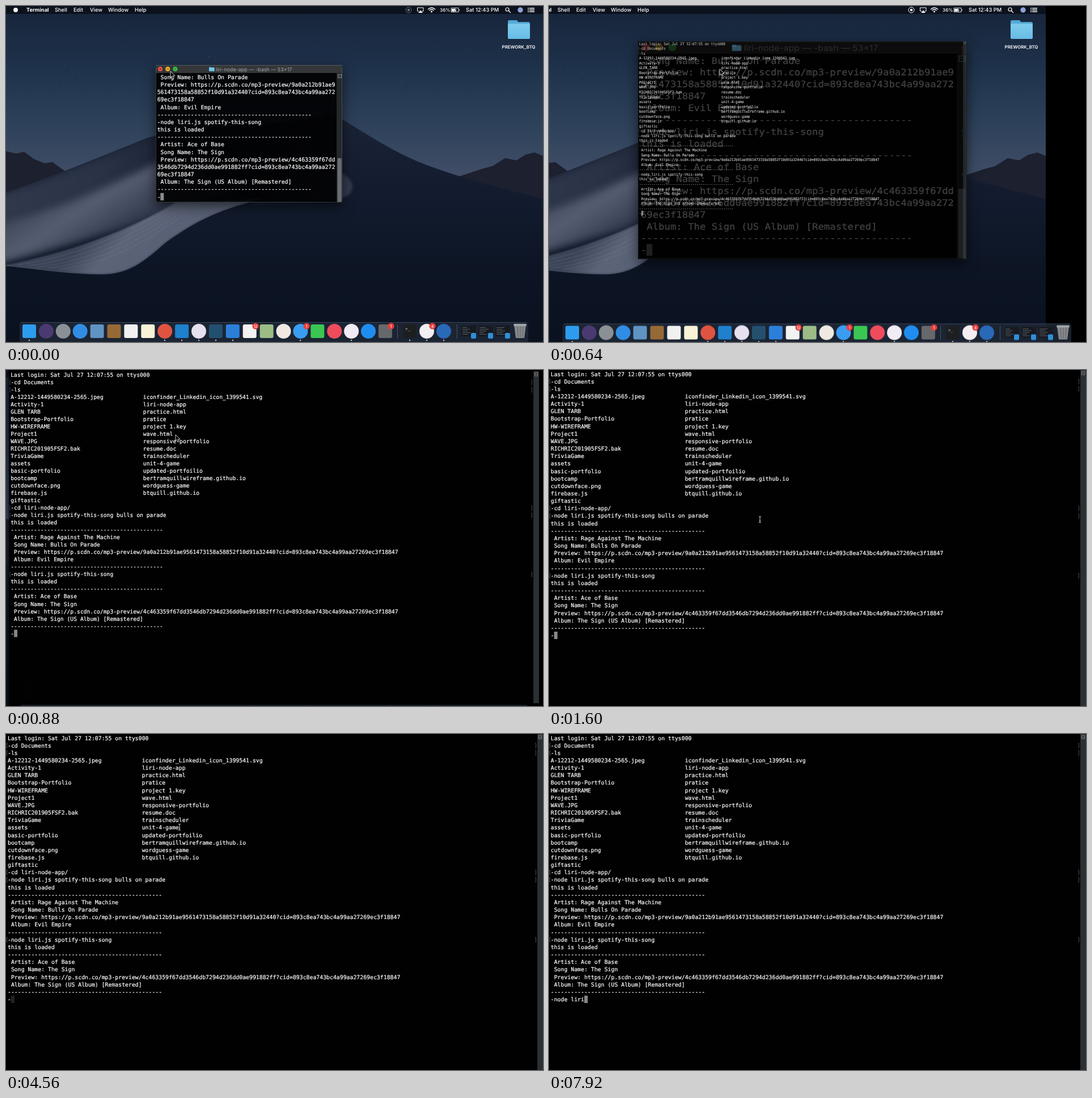
These frames come from a looping animation (947x592 px, 8 s). An HTML page with a canvas:

```html
<!DOCTYPE html>
<html lang="en">
<head>
<meta charset="utf-8">
<title>Terminal going full screen</title>
<style>
html, body { margin: 0; width: 100%; height: 100%; overflow: hidden; background: #000; }
canvas { display: block; }
</style>
</head>
<body>
<canvas id="stage" width="947" height="592"></canvas>
<script>
const W = 947, H = 592, LOOP = 8000, STEP = 80;
const CHAR = 5.923, ROW = 13.157;
const MONO = '9.837px "DejaVu Sans Mono", monospace';
const SANS = 'Inter, sans-serif';
const WIN = { x: 264, y: 104, w: 329, h: 242 };
let g = document.getElementById('stage').getContext('2d');

// Terminal contents
const CID = '?cid=893c8ea743bc4a99aa27269ec3f18847';
const URL_BASE = 'https://p.scdn.co/mp3-preview/';
const DASHES = '-'.repeat(46);
const song = (artist, name, hash, album) => [
  'this is loaded', DASHES, ' Artist: ' + artist, ' Song Name: ' + name,
  ' Preview: ' + URL_BASE + hash + CID, ' Album: ' + album, DASHES];
const LEFT = ['A-12212-1449580234-2565.jpeg', 'Activity-1', 'GLEN TARB', 'Bootstrap-Portfolio',
  'HW-WIREFRAME', 'Project1', 'WAVE.JPG', 'RICHRIC201905FSF2.bak', 'TriviaGame', 'assets',
  'basic-portfolio', 'bootcamp', 'cutdownface.png', 'firebase.js', 'giftastic'];
const RIGHT = ['iconfinder_Linkedin_icon_1399541.svg', 'liri-node-app', 'practice.html', 'pratice',
  'project 1.key', 'wave.html', 'responsive-portfolio', 'resume.doc', 'trainscheduler',
  'unit-4-game', 'updated-portfoilio', 'bertramquillwireframe.github.io', 'wordguess-game',
  'btquill.github.io'];
const LINES = [
  'Last login: Sat Jul 27 12:07:55 on ttys000', '-cd Documents', '-ls',
  ...LEFT.map((name, i) => name.padEnd(40) + (RIGHT[i] || '')),
  '-cd liri-node-app/', '-node liri.js spotify-this-song bulls on parade',
  ...song('Rage Against The Machine', 'Bulls On Parade',
    '9a0a212b91ae9561473158a58852f10d91a32440', 'Evil Empire'),
  '-node liri.js spotify-this-song',
  ...song('Ace of Base', 'The Sign',
    '4c463359f67dd3546db7294d236dd0ae991882ff', 'The Sign (US Album) [Remastered]')];
const WRAPPED = LINES.flatMap(s => s.match(/.{1,53}/g)).slice(-16);
const MARKED = [1, 2, 18, 19, 27];

// Motion: [time, value]
const ZOOM = [[400, 0], [480, .02], [560, .12], [640, .405], [720, .755], [800, .92], [880, .98], [960, 1]];
const SLIDE = [[480, 0], [560, 14], [640, 71], [720, 257], [800, 640], [880, 942], [960, 1010]];
const DOCK_DROP = [[480, 0], [560, .5], [640, 2.5], [720, 9], [800, 22], [880, 33], [960, 45]];
const MOUSE_X = [[0, 290], [320, 301], [720, 301], [880, 299], [1120, 300], [1680, 384], [1840, 384], [2080, 306]];
const MOUSE_Y = [[0, 115], [320, 111], [720, 111], [880, 114], [1120, 116], [1680, 288], [1840, 288], [2080, 164]];
const TYPED = 'node liri';
const KEYS = [5120, 6000, 6320, 6400, 6800, 7120, 7360, 7520, 7680];

function at(keys, t) {
  if (t <= keys[0][0]) return keys[0][1];
  for (let i = 1; i < keys.length; i++) {
    const [t0, a] = keys[i - 1], [t1, b] = keys[i];
    if (t <= t1) return a + (b - a) * (t - t0) / (t1 - t0);
  }
  return keys[keys.length - 1][1];
}

// Drawing helpers
function rect(x, y, w, h, color, r = 0) {
  g.fillStyle = color;
  g.beginPath();
  g.roundRect(x, y, w, h, r);
  g.fill();
}
function disc(x, y, r, color) {
  g.fillStyle = color;
  g.beginPath();
  g.arc(x, y, r, 0, 7);
  g.fill();
}
function text(s, x, y, font, color = '#fff', align = 'left') {
  g.font = font;
  g.textRendering = 'geometricPrecision';
  g.textAlign = align;
  g.fillStyle = color;
  g.fillText(s, x, y);
}
// Terminal type, slightly thickened
function mono(s, x, y) {
  text(s, x, y, MONO);
  g.strokeStyle = '#fff';
  g.lineWidth = .22;
  g.strokeText(s, x, y);
}
function shape(d, fill) {
  g.fillStyle = fill;
  g.fill(new Path2D(d));
}
function stroke(d, color, width = 1) {
  g.strokeStyle = color;
  g.lineWidth = width;
  g.stroke(new Path2D(d));
}
function blend(x0, y0, x1, y1, ...colors) {
  const grad = g.createLinearGradient(x0, y0, x1, y1);
  colors.forEach((c, i) => grad.addColorStop(i / (colors.length - 1), c));
  return grad;
}
function folder(x, y, w, h) {
  rect(x, y, w * .45, h * .4, '#4fa6d3', h * .08);
  rect(x, y + h * .1, w, h * .9, '#58add9', h * .08);
  rect(x, y + h * .2, w, h * .8, blend(0, y, 0, y + h, '#85d0f0', '#67bce5'), h * .08);
}

function wallpaper() {
  rect(0, 0, W, H, blend(0, 0, 0, 310, '#162439', '#1e314a', '#2d415a', '#434f68'));
  for (let i = 0; i < 40; i++) {
    const n = k => Math.abs(Math.sin(i * k) * 4375.3) % 1;
    rect(n(12.9) * W, 16 + n(78.2) * 150, 1, 1, `rgba(190,210,235,${.1 + n(3.7) * .25})`);
  }
  shape('M0 256L18 260L32 257L50 270L68 277L82 275L104 291L130 303V340H0Z', '#1d202e');
  shape('M800 300L836 288L858 282L880 268L900 272L916 262L932 258L947 264V360H800Z', '#1c202f');
  const dune = 'M0 328C80 302 160 268 250 232C380 200 490 218 567 187C600 200 640 232 700 262C760 292 850 315 947 340V592H0Z';
  shape(dune, blend(0, 190, 0, 592, '#1b2437', '#131c2f', '#0d1525', '#0a111f'));
  // Soft light on the sand, kept inside the dune
  g.save();
  g.clip(new Path2D(dune));
  g.filter = 'blur(7px)';
  shape('M-20 334C80 302 160 268 250 232L430 218L400 340L-20 455Z', blend(0, 330, 330, 250, '#30384b', '#2a3245', '#182033'));
  shape('M-20 385C90 362 180 318 280 270L420 270L430 325C280 350 130 420 -20 452Z',
    blend(60, 330, 130, 440, '#3b4356', '#565d71', '#343c50'));
  g.filter = 'blur(2px)';
  shape('M567 187C540 220 520 250 590 293C612 305 616 320 605 332C590 346 520 344 440 350L350 300L430 218Z',
    blend(400, 200, 610, 330, '#151d2f', '#1d2639', '#353d50'));
  g.filter = 'blur(1px)';
  shape('M-4 457C110 435 220 395 300 345L450 340C365 360 325 385 280 417C243 450 215 473 165 472C100 471 50 462 -4 457Z',
    blend(150, 405, 215, 470, '#3c4458', '#5c6478', '#596176'));
  g.restore();
  for (let i = 0; i < 5; i++)
    stroke(`M${20 + i * 18} ${456 + i * 2}C${130 + i * 12} ${442 + i * 3} ${210 + i * 7} ${400 + i * 6} ${310 + i * 8} 347`,
      'rgba(150,160,182,.1)', 2);
  stroke('M0 457C50 462 100 471 165 472C215 473 243 450 280 417C325 385 365 360 450 340', 'rgba(165,173,192,.35)');
}

function menuBar(active) {
  rect(0, 0, W, 14, '#0c121d');
  const font = '500 9.3px ' + SANS;
  disc(17, 7, 4, '#f2f2f2');
  text('Terminal', 36, 10.4, '700 9.3px ' + SANS);
  [['Shell', 86], ['Edit', 119], ['View', 148], ['Window', 180], ['Help', 227]]
    .forEach(([s, x]) => text(s, x, 10.4, font));
  const tone = active ? '#fff' : '#68707c';
  stroke('M715 7A5 5 0 1 1 705 7A5 5 0 1 1 715 7', tone);
  rect(708, 5, 4, 4, tone);
  stroke('M728 9H725.5V3H736V9H733.5', '#fff');
  shape('M727 12L731 7.5L735 12Z', '#fff');
  stroke('M744 6Q750.5 0 757 6M746.5 8Q750.5 4 754.5 8', '#fff', 1.3);
  disc(750.5, 10, 1.4, '#fff');
  text('36%', 765, 10.2, '500 8.2px ' + SANS);
  stroke('M785 3.5H798V10.5H785ZM799.5 6V8.5', '#ddd');
  rect(786, 5, 5, 4.5, '#fff');
  shape('M793 3L789 7.8H792L791 11.5L795 6.5H792Z', '#fff');
  text('Sat 12:43 PM', 811, 10.4, font);
  stroke('M887 6A3 3 0 1 1 881 6A3 3 0 1 1 887 6M886.5 8.5L890 12', '#fff', 1.2);
  disc(907, 7, 4.7, '#8f9fd8');
  stroke('M920 4H922M923 4H932M920 7H922M923 7H932M920 10H922M923 10H932', '#fff', 1.4);
}

function desktop(active) {
  wallpaper();
  menuBar(active);
  folder(885, 25, 39, 33);
  text('PREWORK_BTQ', 904, 75, '600 7.8px ' + SANS, '#fff', 'center');
}

// Dock icons as plain circles (c) and squares (s)
const ICONS = ('s2e9cee c4b3a72 c8a9096 c318de4 s5f93c2 s966a36 sf1f1f1 sf8f2d6 cdf5440 s1f80cd ce6e1ef s23506e ' +
  's2c7fd8 sf2f2f2 s9cbc86 cefe9e2 c3b9df2 s3bc654 cee4c5c cf1ebf5 c1f8def s66686c').split(' ');
const APPS = 's1d1e20 cf2eef2 c2a68b8'.split(' ');
function icon(code, x) {
  const color = '#' + code.slice(1);
  code[0] === 'c' ? disc(x, 573, 13, color) : rect(x - 12, 561, 24, 24, color, 3);
}
function dock() {
  rect(24, 557, 897, 40, 'rgba(32,41,57,.82)', 4);
  stroke('M27 557.5H918', 'rgba(130,145,170,.3)');
  ICONS.forEach((c, i) => icon(c, 41 + i * 29.9));
  APPS.forEach((c, i) => icon(c, 712 + i * 30));
  text('>_', 704, 571, '7px "DejaVu Sans Mono", monospace', '#ddd');
  stroke('M690.5 561V586M795.5 561V586', 'rgba(160,170,190,.35)');
  [816, 846, 876].forEach((x, i) => {
    rect(x - 13, 563, 26, 19, '#171a20', 1);
    for (let k = 0; k < 5; k++) rect(x - 11, 566 + k * 3, 8 + (k * 5 + i * 3) % 9, 1, '#59616b');
    rect(x + 4, 576, 9, 10, '#2f8ed8', 2);
  });
  shape('M896 562H917L914 585H899Z', '#85888b');
  stroke('M902 564L903 583M907 564V583M912 564L911 583', '#5e6265');
  rect(895, 560, 23, 4, '#a4a7a9', 2);
  [[440, '12'], [530, '1'], [679, '1'], [752, '4']].forEach(([x, n]) => {
    disc(x, 564, 5.6, '#ec3d3a');
    text(n, x, 566.5, '500 7px ' + SANS, '#fff', 'center');
  });
  [41, 280, 310, 340, 370, 400, 519, 609, 712, 742, 772].forEach(x => disc(x, 589, 1.2, '#c8ced8'));
}

function smallWindow() {
  rect(0, 0, WIN.w, WIN.h, 'rgba(0,0,0,.91)', 4);
  rect(0, 0, WIN.w, 14, '#343638', [4, 4, 0, 0]);
  rect(0, 0, WIN.w, 1, '#55585a', 1);
  [['#f2504a', 'M6.5 5.5L9.5 8.5M9.5 5.5L6.5 8.5'], ['#f0b429', 'M19 7H23.5'], ['#35c048', 'M33 8.5L36 5.5']]
    .forEach(([c, mark], i) => {
      disc(8 + i * 13.2, 7, 4, c);
      stroke(mark, 'rgba(60,20,0,.7)');
    });
  folder(94, 3.5, 9.5, 7.5);
  text('liri-node-app — -bash — 53×17', 106, 10.5, '400 9px ' + SANS, '#a6a8aa');
  WRAPPED.forEach((s, i) => mono(s, 2.7, 25 + i * ROW));
  mono('-', 2.7, 25 + 16 * ROW);
  rect(8.3, 225.5, 6, 13, '#8d8d8d');
  rect(319, 14, 10, 228, '#25282a');
  rect(320.5, 164, 7, 77, '#6b6e70', 2);
  stroke('M321.5 16.5H327.5V22.5H321.5ZM323 19.5H326', '#8a8d8f');
  stroke('M.5 5V238Q.5 241.5 4 241.5H325Q328.5 241.5 328.5 238V5', 'rgba(140,145,150,.35)');
}

function fullWindow(typed, caret) {
  rect(0, 0, W, H, '#010101');
  rect(937, 0, 10, H, '#2c3033');
  stroke('M939.5 2.5H944.5V8.5H939.5ZM940.5 5.5H943.5', '#7c8082');
  MARKED.forEach(i => {
    const y = 7 + i * ROW;
    stroke(`M3 ${y - 4}H1.5V${y + 4}H3M933 ${y - 4}H934.5V${y + 4}H933`, '#4a4a4a');
  });
  LINES.forEach((s, i) => mono(s, 3, 10.5 + i * ROW));
  const prompt = '-' + typed;
  mono(prompt, 3, 10.5 + 35 * ROW);
  rect(3 + prompt.length * CHAR, 461, 6, 13, `rgba(136,136,136,${caret})`);
}

function pointer(t) {
  g.save();
  g.translate(at(MOUSE_X, t), at(MOUSE_Y, t));
  if (t < 960) {
    const arrow = 'M0 0V11L2.7 8.6L4.5 12.6L6.3 11.8L4.6 8H8Z';
    shape(arrow, '#000');
    stroke(arrow, '#e4e4e4', .9);
  } else {
    stroke('M-2 -5.5Q0 -5.5 0 -4V4Q0 5.5 -2 5.5M2 -5.5Q0 -5.5 0 -4M0 4Q0 5.5 2 5.5M-1 2H1', '#d8d8d8');
  }
  g.restore();
}

function caretAlpha(t, lastKey) {
  const idle = t - lastKey - 720;
  return idle < 0 ? 1 : at([[0, 1], [320, 0], [440, 0], [640, 1]], idle % 1200);
}

// Still layers are painted once
function layer(paint) {
  const c = document.createElement('canvas'), main = g;
  c.width = W;
  c.height = H;
  g = c.getContext('2d');
  paint();
  g = main;
  return c;
}
const idleDesk = layer(() => desktop(false));
const busyDesk = layer(() => desktop(true));
const dockLayer = layer(dock);

function draw(t) {
  const p = at(ZOOM, t), typedCount = KEYS.filter(k => k <= t).length;
  rect(0, 0, W, H, '#000');
  if (p < 1) {
    g.drawImage(t < 400 ? idleDesk : busyDesk, -Math.round(at(SLIDE, t)), 0);
    g.drawImage(dockLayer, 0, at(DOCK_DROP, t));
  }
  const x = WIN.x * (1 - p), y = WIN.y * (1 - p);
  const w = WIN.w + (W - WIN.w) * p, h = WIN.h + (H - WIN.h) * p;
  if (p < 1) {
    g.save();
    g.beginPath();
    g.rect(0, 0, W, H);
    g.rect(x, y, w, h);
    g.clip('evenodd');
    g.shadowColor = 'rgba(0,0,0,.6)';
    g.shadowBlur = 22;
    g.shadowOffsetY = 7;
    rect(x, y, w, h, '#000', 4);
    g.restore();
  }
  if (p > 0) {
    g.save();
    g.translate(x, y);
    g.scale(w / W, h / H);
    fullWindow(TYPED.slice(0, typedCount), caretAlpha(t, typedCount ? KEYS[typedCount - 1] : 2400));
    g.restore();
  }
  if (p < 1) {
    g.save();
    g.translate(x, y);
    g.scale(w / WIN.w, h / WIN.h);
    g.globalAlpha = (Math.exp(-3.6 * p) - .027) / .973;
    smallWindow();
    g.restore();
  }
  if (!typedCount) pointer(t);
}

const start = performance.now();
function tick() {
  const t = (performance.now() - start) % LOOP;
  draw(Math.floor(t / STEP) * STEP);
  requestAnimationFrame(tick);
}
tick();
</script>
</body>
</html>
```
